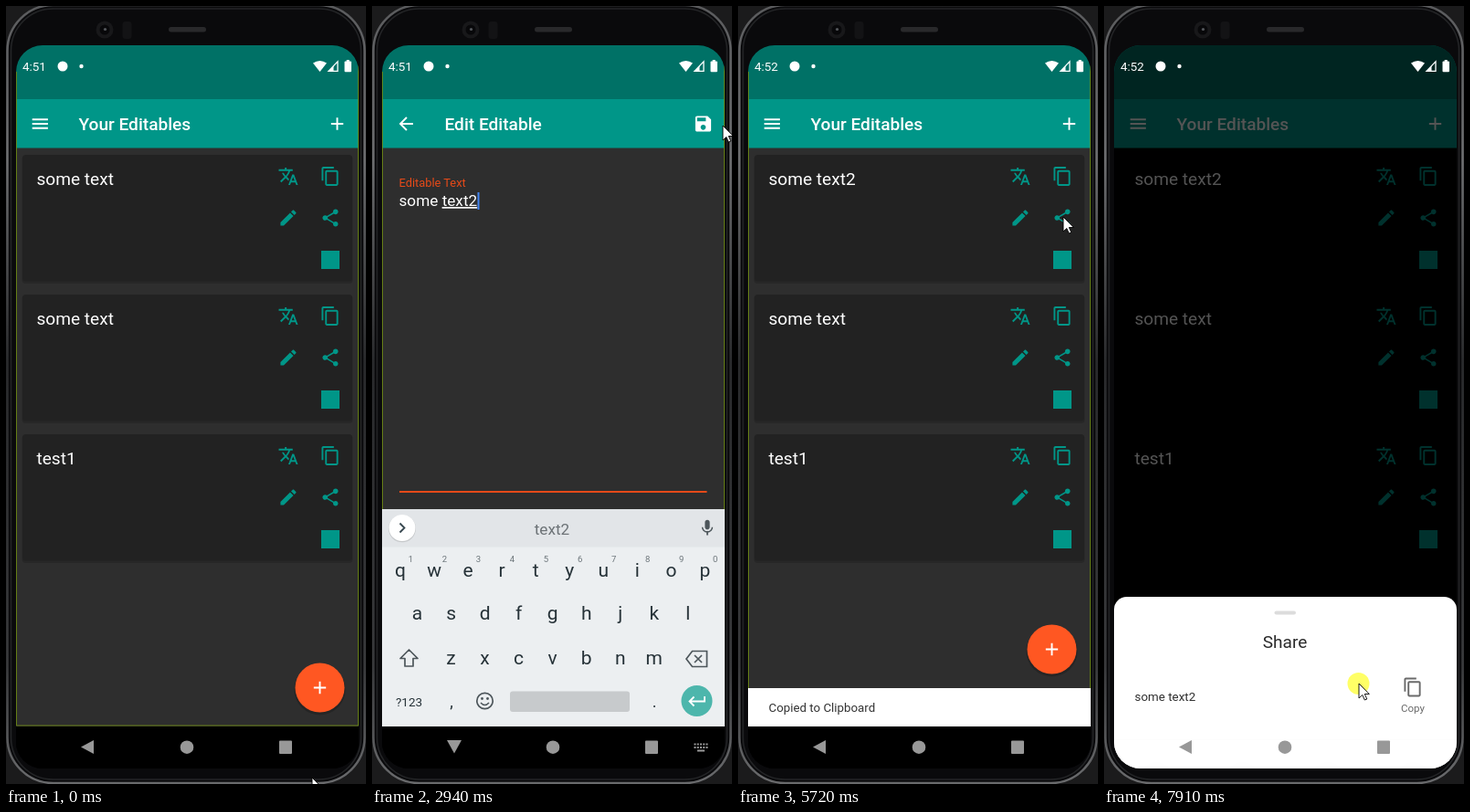
Recreate the animation shown at these times as an HTML page. Size 394 by 852 pixels, loop 7.99 s.

```html
<!DOCTYPE html>
<html lang="en">
<head>
<meta charset="utf-8">
<title>Editables</title>
<style>
html, body { margin: 0; width: 100%; height: 100%; overflow: hidden; background: #1b1b1c; }
svg { display: block; width: 394px; height: 852px; font-family: Roboto, sans-serif; }
</style>
</head>
<body>
<svg id="stage" viewBox="0 0 394 852" xmlns="http://www.w3.org/2000/svg"></svg>
<script>
const LOOP = 7990, DP = 0.955, TEAL = '#009688';

const ICON = {
  menu: 'M3 18h18v-2H3zM3 13h18v-2H3zM3 6v2h18V6z',
  add: 'M19 13h-6v6h-2v-6H5v-2h6V5h2v6h6z',
  back: 'M20 11H7.83l5.59-5.59L12 4l-8 8 8 8 1.41-1.41L7.83 13H20z',
  save: 'M17 3H5c-1.11 0-2 .9-2 2v14c0 1.1.89 2 2 2h14c1.1 0 2-.9 2-2V7l-4-4zm-5 16c-1.66 0-3-1.34-3-3s1.34-3 3-3 3 1.34 3 3-1.34 3-3 3zm3-10H5V5h10v4z',
  translate: 'M12.87 15.07l-2.54-2.51.03-.03c1.74-1.94 2.98-4.17 3.71-6.53H17V4h-7V2H8v2H1v1.99h11.17C11.5 7.92 10.44 9.75 9 11.35 8.07 10.32 7.3 9.19 6.69 8h-2c.73 1.63 1.73 3.17 2.98 4.56l-5.09 5.02L4 19l5-5 3.11 3.11.76-2.04zM18.5 10h-2L12 22h2l1.12-3h4.75L21 22h2l-4.5-12zm-2.62 7l1.62-4.33L19.12 17h-3.24z',
  copy: 'M16 1H4c-1.1 0-2 .9-2 2v14h2V3h12V1zm3 4H8c-1.1 0-2 .9-2 2v14c0 1.1.9 2 2 2h11c1.1 0 2-.9 2-2V7c0-1.1-.9-2-2-2zm0 16H8V7h11v14z',
  edit: 'M3 17.25V21h3.75L17.81 9.94l-3.75-3.75L3 17.25zM20.71 7.04c.39-.39.39-1.02 0-1.41l-2.34-2.34c-.39-.39-1.02-.39-1.41 0l-1.83 1.83 3.75 3.75 1.83-1.83z',
  share: 'M18 16.08c-.76 0-1.44.3-1.96.77L8.91 12.7c.05-.23.09-.46.09-.7s-.04-.47-.09-.7l7.05-4.11c.54.5 1.25.81 2.04.81 1.66 0 3-1.34 3-3s-1.34-3-3-3-3 1.34-3 3c0 .24.04.47.09.7L8.04 9.81C7.5 9.31 6.79 9 6 9c-1.66 0-3 1.34-3 3s1.34 3 3 3c.79 0 1.5-.31 2.04-.81l7.12 4.16c-.05.21-.08.43-.08.65 0 1.61 1.31 2.92 2.92 2.92s2.92-1.31 2.92-2.92-1.31-2.92-2.92-2.92z',
  mic: 'M12 14c1.66 0 3-1.34 3-3V5c0-1.66-1.34-3-3-3S9 3.34 9 5v6c0 1.66 1.34 3 3 3zm5.3-3c0 3-2.54 5.1-5.3 5.1S6.700 14 6.700 11H5c0 3.41 2.72 6.23 6 6.72V21h2v-3.28c3.28-.48 6-3.3 6-6.72z'
};

const icon = (name, x, y, fill, size = 24 * DP) =>
  `<path d="${ICON[name]}" fill="${fill}" transform="translate(${x - size / 2} ${y - size / 2}) scale(${size / 24})"/>`;
const text = (s, x, y, size, fill, extra = '') =>
  `<text x="${x}" y="${y}" font-size="${size}" fill="${fill}" ${extra}>${s}</text>`;
const mid = (s, x, y, size, fill, extra = '') => text(s, x, y, size, fill, 'text-anchor="middle" ' + extra);
const rect = (x, y, w, h, fill, extra = '') =>
  `<rect x="${x}" y="${y}" width="${w}" height="${h}" fill="${fill}" ${extra}/>`;
const circle = (x, y, r, fill, extra = '') => `<circle cx="${x}" cy="${y}" r="${r}" fill="${fill}" ${extra}/>`;
const line = (d, stroke, w = 1.8, extra = '') =>
  `<path d="${d}" fill="none" stroke="${stroke}" stroke-width="${w}" ${extra}/>`;

function phone() {
  return rect(0, 0, 394, 852, '#1b1b1c') +
    rect(1.5, -1, 391, 852, '#0a0a0c', 'rx="50" stroke="url(#edge)" stroke-width="2.5"') +
    rect(5.5, 3, 383, 844, 'none', 'rx="46" stroke="#242527" stroke-width="1.5"') +
    circle(108, 26, 9.5, '#18181a') + circle(108, 26, 5.5, '#08080a') + circle(108.5, 25.500, 1.6, '#55585c') +
    rect(127.500, 17, 10, 19, '#131315', 'rx="3"') +
    rect(178, 23, 41, 5.5, '#29292b', 'rx="2.7"');
}

function bar(title, left, right) {
  return rect(11, 102, 375, 53.5, TEAL) + icon(left, 37.3, 129, '#fff') +
    text(title, 79.500, 135.800, 19.1, '#fff', 'font-weight="500"') + icon(right, 362.5, 129, '#fff');
}

function card(y, label, id = '') {
  return rect(17.500, y + 1, 362, 140, '#000', 'rx="4" opacity=".16"') +
    rect(18, y, 361, 138.5, '#222', 'class="card" rx="3.5"') +
    text(label, 33.500, y + 32.5, 19.1, '#fff', id) +
    icon('translate', 309, y + 23.5, TEAL) + icon('copy', 355, y + 23.5, TEAL) +
    icon('edit', 309, y + 69, TEAL) + icon('share', 355, y + 69, TEAL) +
    rect(345, y + 105, 20, 20, TEAL);
}

function listPage() {
  return rect(11, 155, 375, 634, '#2e2e2e', 'id="listBg"') + bar('Your Editables', 'menu', 'add') +
    card(163, 'some text', 'id="first"') + card(316, 'some text') + card(469, 'test1') +
    `<g id="fab">${circle(343.5, 748.5, 28, '#000', 'opacity=".2"')}${circle(343.5, 746.5, 27, '#ff5722')}${icon('add', 343.5, 746.5, '#fff')}</g>`;
}

function editPage() {
  return rect(11, 155, 375, 634, '#2e2e2e') + bar('Edit Editable', 'back', 'save') +
    text('Editable Text', 29.500, 198, 12.85, '#a2a2a2', 'id="label"') +
    text('some <tspan id="word">text</tspan>', 29.500, 219, 17.2, '#fff') +
    rect(106, 204, 2, 19, '#4285f4', 'id="caret"') +
    rect(30, 615, 336.5, 1, '#7b7b7b', 'id="rule"');
}

function keyboard() {
  const ink = '#263238', soft = '#4d565b';
  const row = (keys, x, y) => [...keys].map((k, i) => mid(k, x + i * 37.05, y, 21, ink)).join('');
  const digits = [...'1234567890'].map((k, i) => mid(k, 42.3 + i * 37.05, 609, 9.5, '#6b7479')).join('');
  return rect(11, 551, 375, 238, '#eceff1') + rect(11, 551, 375, 41.5, '#e2e5e8') +
    circle(33, 572.3, 15, '#000', 'opacity=".12"') + circle(33, 571.5, 14.5, '#fff') +
    line('M30.5 566.5l5 5-5 5', '#37474f') +
    mid('text', 197, 578.5, 17.2, '#6c7276', 'id="hint"') + icon('mic', 367, 571.5, soft, 21) +
    row('qwertyuiop', 31, 625) + digits + row('asdfghjkl', 49.500, 672) + row('zxcvbnm', 86.500, 720.5) +
    line('M40.500 705l9.500 9.500h-5v8.500h-9v-8.500h-5z', soft, 1.7, 'stroke-linejoin="round"') +
    line('M350.500 706.500h16v17h-16l-6.500-8.500zM353 711l8 8m0-8l-8 8', soft, 1.7) +
    mid('?123', 40.500, 766.500, 13.5, ink) + mid(',', 87, 767.500, 18, ink) +
    circle(123.500, 761, 8.700, 'none', `stroke="${soft}" stroke-width="1.7"`) +
    circle(120.500, 758.500, 1.4, soft) + circle(126.500, 758.500, 1.4, soft) +
    line('M119 763q4.500 5 9 0', soft, 1.6) +
    rect(151, 750.5, 131, 22.500, '#c7cacc', 'rx="3"') + mid('.', 309, 767.500, 18, ink) +
    circle(355.500, 761, 17, '#4db6ac') + line('M364 756v5.500h-16.500m5-5l-5 5 5 5', '#fff');
}

function statusIcons() {
  return text('4:51', 18, 71.300, 13.4, '#fff', 'id="clock"') + circle(62, 66, 5.5, '#fff') + circle(82.5, 66, 2.2, '#fff') +
    '<path d="M336 62.500q7.500-5 15 0L343.500 72z" fill="#fff"/>' +
    line('M363 60.800V71.300H353z', '#fff', 1.3) + '<path d="M358.500 65.500V72H352.500z" fill="#fff"/>' +
    rect(370.500, 60.500, 7.500, 11.800, '#fff', 'rx="1"') + rect(372.700, 59, 3, 2, '#fff');
}

function navIcons() {
  return '<path id="navBack" d="M82 811.500L96 804V819z" fill="#989898"/>' +
    '<path id="navDown" d="M82 804H98L90 818.500z" fill="#989898"/>' +
    circle(198, 811.700, 7.3, '#989898') + rect(299, 804.500, 14, 14.5, '#989898', 'rx="1"') +
    `<g id="navKeys">${line('M352.500 808.500h15m-15 3.500h15', '#989898', 2, 'stroke-dasharray="2 1.25"')}${rect(356, 814.500, 8, 2, '#989898')}</g>`;
}

// Sheet content is laid out from its own top edge.
function sheet() {
  const cols = [57.500, 151.500, 245, 338.500];
  const apps = [['Bluetooth', '', '#1a73e8'], ['Olvat', 'Copy to clip...', '#1da462'], ['Olvat', 'Save to Olvat', '#1da462'], ['Messages', '', '#1a73e8']];
  const ghost = x => `<path d="M${x - 18} 199a18 18 0 0 1 36 0v14q0 4-4 4h-14a18 18 0 0 1-18-18z" fill="#f4f5f6"/>` +
    rect(x - 34.500, 225.5, 69, 18.5, '#f5f6f7', 'rx="8"');
  const app = ([name, sub, tint], i) => {
    const x = cols[i], full = i === 3;
    return circle(x, 315.500, 19, '#000', 'opacity=".1"') + circle(x, 315, 18.3, full ? tint : '#fff') +
      (full ? '' : circle(x, 315, 11, tint)) +
      mid(name, x, 356.500, 13.4, '#333') + mid(sub, x, 372, 11.3, '#6b6b6b');
  };
  return rect(11, 0, 375, 860, '#fff', 'rx="14"') + rect(186.500, 15.500, 23.500, 4, '#dcdcdc', 'rx="2"') +
    mid('Share', 198, 55.500, 19.1, '#2b2b2b') + text('some text2', 33.500, 113.5, 13.4, '#2f2f2f') +
    icon('copy', 338, 99, '#6a6a6a') + mid('Copy', 338, 126, 11.5, '#6a6a6a') +
    rect(11, 156, 375, 1, '#dedede') + cols.map(ghost).join('') + rect(11, 271.500, 375, 1.5, '#dfe0e1') +
    apps.map(app).join('') + mid('App list', 198, 416, 13.4, '#666');
}

const svg = document.getElementById('stage');
svg.innerHTML = `<defs>
  <linearGradient id="edge" x2="0" y2="1">
    <stop offset="0" stop-color="#5a5b5d"/><stop offset=".2" stop-color="#707173"/>
    <stop offset=".46" stop-color="#2a2b2d"/><stop offset=".85" stop-color="#3a3b3d"/><stop offset="1" stop-color="#6a6b6d"/>
  </linearGradient>
  <clipPath id="screen">${rect(11, 43, 375, 792, '#000', 'rx="29"')}</clipPath></defs>
  ${phone()}
  <g clip-path="url(#screen)">
    ${rect(11, 43, 375, 792, '#000')}
    ${listPage()}
    <g id="editPage">${editPage()}</g>
    ${rect(11, 43, 375, 59, '#007166')}
    ${line('M11.500 72V788H385.500V62', '#6f8c12', 1, 'id="frame" opacity=".85"')}
    <g id="snack">${rect(11, 747, 375, 42, '#fff')}${text('Copied to Clipboard', 33.500, 772.500, 13.3, '#333')}</g>
    <g id="keys">${keyboard()}</g>
    ${rect(11, 789, 375, 46, '#000')}
    ${rect(11, 43, 375, 792, '#000', 'id="dim"')}
    ${statusIcons()}
    <g id="sheet">${sheet()}</g>
    ${rect(11, 789, 375, 46, '#fff', 'id="navVeil"')}
    ${navIcons()}
  </g>
  <g id="pointer">${circle(-.5, 0, 12, '#ff0', 'id="press" opacity=".6"')}
    <path d="M0 0V16L3.800 12.500 6.300 18 8.800 17 6.300 11.500H11.300z" fill="#fff" stroke="#000" stroke-width=".9"/></g>`;

const el = {};
svg.querySelectorAll('[id]').forEach(n => el[n.id] = n);
const cards = svg.querySelectorAll('.card');

const set = (n, attrs) => { for (const k in attrs) n.setAttribute(k, attrs[k]); };
const show = (n, on) => n.setAttribute('display', on ? 'inline' : 'none');
const move = (n, x, y) => n.setAttribute('transform', `translate(${x} ${y})`);
const write = (n, s) => { if (n.textContent !== s) n.textContent = s; };
const clamp = v => Math.min(1, Math.max(0, v));
const smooth = p => p * p * (3 - 2 * p);
const ramp = (t, a, b) => smooth(clamp((t - a) / (b - a)));
const gray = v => `rgb(${v},${v},${v})`;

// Pointer stops: time, x, y
const PATH = [
  [0, 335, 845], [690, 295, 244], [920, 295, 244], [1000, 298, 234], [1770, 298, 234],
  [1880, 290, 250], [2520, 290, 250], [2900, 384, 131], [2980, 384, 131], [3200, 368, 131],
  [3780, 368, 131], [4170, 351, 193], [4960, 351, 193], [5170, 361, 212], [5280, 361, 212],
  [5490, 356, 231], [6430, 356, 231], [6730, 311, 373], [7040, 290, 497], [7080, 290, 497],
  [7340, 290, 441], [7600, 290, 441], [7910, 279, 742], [LOOP, 279, 742]
];
const PRESSES = [[1080, 1200], [1890, 1980], [3240, 3380], [4180, 4300], [5640, 5715], [7060, LOOP]];

function pointerAt(t) {
  const i = Math.max(1, PATH.findIndex(p => p[0] > t));
  const [t0, x0, y0] = PATH[i - 1], [t1, x1, y1] = PATH[i];
  const p = ramp(t, t0, t1);
  return [x0 + (x1 - x0) * p, y0 + (y1 - y0) * p];
}

function render(t) {
  const [px, py] = pointerAt(t);
  move(el.pointer, px, py);
  show(el.press, PRESSES.some(([a, b]) => t >= a && t < b));

  // Edit page
  const enter = ramp(t, 1250, 1520), leave = ramp(t, 3440, 3725);
  move(el.editPage, 0, (1 - enter) * 370 + leave * 185);
  set(el.editPage, { opacity: enter * (1 - leave) });
  show(el.editPage, enter > 0 && leave < 1);
  const focus = t >= 1980, typed = t >= 2540;
  set(el.label, { fill: focus ? '#e64a19' : '#a2a2a2' });
  set(el.rule, { y: focus ? (t < 3480 ? 531 : 614) : 615, height: focus ? 2 : 1, fill: focus ? '#e64a19' : '#7b7b7b' });
  write(el.word, typed ? 'text2' : 'text');
  set(el.word, { 'text-decoration': focus ? 'underline' : 'none' });
  set(el.caret, { x: typed ? 115.5 : 106 });
  show(el.caret, focus && (typed ? (t - 2540) % 1000 < 500 : true));
  write(el.first, t >= 3400 ? 'some text2' : 'some text');

  // Keyboard
  const up = ramp(t, 1980, 2300) - ramp(t, 3420, 3580);
  move(el.keys, 0, 238 * (1 - up));
  show(el.keys, up > 0);
  write(el.hint, typed ? 'text2' : 'text');
  const typing = t >= 2000 && t < 3480;
  show(el.navBack, !typing);
  show(el.navDown, typing);
  show(el.navKeys, typing);

  // Snackbar
  const snack = ramp(t, 4420, 4710);
  move(el.snack, 0, 42 * (1 - snack));
  show(el.snack, snack > 0);
  move(el.fab, 0, -42 * snack);
  write(el.clock, t >= 4300 ? '4:52' : '4:51');

  // Share sheet
  const dim = ramp(t, 5900, 6450), rise = ramp(t, 6060, 6490);
  set(el.dim, { opacity: 0.67 * dim });
  set(el.listBg, { fill: gray(Math.round(46 * (1 - dim))) });
  cards.forEach(c => set(c, { fill: gray(Math.round(34 * (1 - dim))) }));
  set(el.frame, { opacity: 0.85 * (1 - dim) });
  move(el.sheet, 0, t < 7060 ? 835 - 433 * rise : py - 95);
  show(el.sheet, rise > 0);
  set(el.navVeil, { opacity: 0.93 * rise });
}

function tick() {
  render(performance.now() % LOOP);
  requestAnimationFrame(tick);
}
tick();
</script>
</body>
</html>
```
